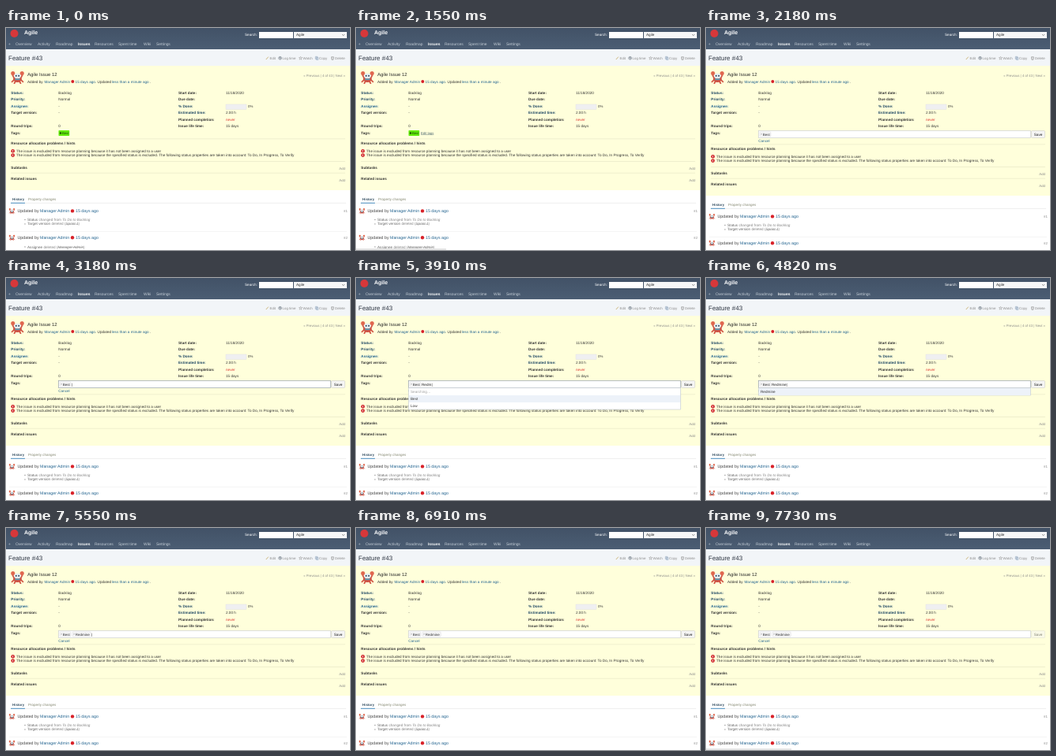
Recreate the animation shown at these times as an HTML page. Size 435 px wide and 282 px high, loop 8000 ms.

```html
<!DOCTYPE html>
<html lang="en">
<head>
<meta charset="utf-8">
<title>Editing issue tags</title>
<style>
  html, body { margin: 0; width: 100%; height: 100%; overflow: hidden; background: #fff; }
  svg { display: block; width: 100vw; height: 100vh; font-family: "Liberation Sans", Arial, sans-serif; text-rendering: geometricPrecision; }
  text { white-space: pre; }
</style>
</head>
<body>
<svg id="stage" viewBox="0 0 435 282">
  <defs>
    <linearGradient id="bar" x2="0" y2="1">
      <stop offset="0" stop-color="#425267"/><stop offset="1" stop-color="#4b5d73"/>
    </linearGradient>
    <symbol id="crab" viewBox="0 0 16 16">
      <path d="M4 9 2 5M12 9l2-4M4 11l-3 3M12 11l3 3M6 12l-2 4M10 12l2 4" stroke="#d35a48" stroke-width="1.7"/>
      <circle cx="2.6" cy="3.4" r="2.4" fill="#e0684f"/><circle cx="13.4" cy="3.4" r="2.4" fill="#e0684f"/>
      <ellipse cx="8" cy="10" rx="5" ry="4" fill="#cf4f40"/>
      <ellipse cx="8" cy="6.5" rx="4" ry="3" fill="#e4eef2"/>
      <circle cx="6.4" cy="6.4" r=".9" fill="#243a4d"/><circle cx="9.6" cy="6.4" r=".9" fill="#243a4d"/>
      <path d="M5 10.5h6" stroke="#5f9fb4" stroke-width="1.8"/>
    </symbol>
  </defs>
</svg>
<script>
const NS = 'http://www.w3.org/2000/svg';
const stage = document.getElementById('stage');
const LOOP = 8000, FORM_SHIFT = 7, PANEL_TOP = 48, PANEL_HEIGHT = 158;
const INK = '#333', LINK = '#22638f', NAVY = '#1d4663', GREY = '#8b8b8b', CREASE = '#e4e4c4';
const USER = 'Manager Admin';

function add(parent, tag, attrs, content) {
  const el = document.createElementNS(NS, tag);
  for (const key in attrs) el.setAttribute(key, attrs[key]);
  if (content !== undefined) el.textContent = content;
  return parent.appendChild(el);
}
const group = (parent = stage) => add(parent, 'g', {});
const rect = (g, x, y, width, height, fill, more) => add(g, 'rect', { x, y, width, height, fill, ...more });
const dot = (g, cx, cy, r, fill) => add(g, 'circle', { cx, cy, r, fill });
const rule = (g, y, stroke, x1 = 0, x2 = 435) => add(g, 'line', { x1, x2, y1: y, y2: y, stroke, 'stroke-width': .6 });
const avatar = (g, x, y, size) => add(g, 'use', { href: '#crab', x, y, width: size, height: size });
const text = (g, x, y, str, fill = INK, size = 4.65, more) =>
  add(g, 'text', { x, y, fill, 'font-size': size, ...more }, str);
const bold = (g, x, y, str, fill = INK, size = 4.65) => text(g, x, y, str, fill, size, { 'font-weight': 700 });

function drawHeader(g) {
  rect(g, 0, 0, 435, 27, 'url(#bar)');
  dot(g, 10.5, 7, 5, '#d8383a');
  bold(g, 23, 7.6, 'Agile', '#fff', 7);
  text(g, 302, 10.2, 'Search:', '#fff');
  rect(g, 320, 5, 43, 8, '#fff');
  rect(g, 364, 5, 67, 8, '#f5f6f7');
  text(g, 367, 10.3, 'Agile');
  add(g, 'path', { d: 'M425 8l1.6 1.6L428.2 8', fill: 'none', stroke: '#555', 'stroke-width': .6 });
  const menu = [[3, '+'], [12, 'Overview'], [40, 'Activity'], [63, 'Roadmap'], [112, 'Resources'],
    [142, 'Spent time'], [174, 'Wiki'], [190, 'Settings']];
  for (const [x, label] of menu) text(g, x, 22, label, '#c3ccd5', 4.95);
  bold(g, 91, 22, 'Issues', '#fff', 4.95);

  rect(g, 0, 27, 435, 21, '#f2f5f8');
  text(g, 3, 40.7, 'Feature #43', '#2c3440', 8);
  const actions = [
    [328.5, 'Edit', '#c3a65e', 'M.3 4l3-3.4'],
    [344.5, 'Log time', '#707a84', 'M.3 2.2a1.8 1.8 0 1 0 3.6 0a1.8 1.8 0 1 0-3.6 0M2 1v1.400h1'],
    [370.5, 'Watch', '#b0b0b0', 'M2 .3l.6 1.3h1.400l-1.100 1 .5 1.5L2 3.300.6 4.100l.5-1.5L0 1.600h1.400z'],
    [391, 'Copy', '#9fb2c6', 'M.3.3h2.400v3H.3zM1.400 1.300h2.400v3H1.400z'],
    [411, 'Delete', '#999', 'M.2.8h3.400M.6 1l.3 3.200h2L3.200 1'],
  ];
  for (const [x, label, stroke, d] of actions) {
    add(g, 'path', { d, stroke, fill: 'none', 'stroke-width': .8, transform: `translate(${x} 36)` });
    text(g, x + 5, 39.7, label, GREY, 4.4);
  }
}

function drawIssue(g) {
  avatar(g, 6, 54, 17);
  text(g, 27, 61, 'Agile Issue 12', '#2c2c2c', 6);
  text(g, 429, 61.5, '« Previous | 4 of 43 | Next »', GREY, 4.3, { 'text-anchor': 'end' });
  text(g, 27, 69.7, 'Added by ');
  text(g, 48.5, 69.7, USER, LINK);
  dot(g, 84.3, 68, 2, '#d8222a');
  text(g, 87.6, 69.7, '15 days ago', LINK);
  text(g, 113, 69.7, '. Updated ');
  text(g, 134, 69.7, 'less than a minute ago', LINK);
  text(g, 182, 69.7, '.');

  const left = [[84, 'Status:', 'Backlog', NAVY], [92.4, 'Priority:', 'Normal', NAVY],
    [100.9, 'Assignee:', '-', LINK], [109, 'Target version:', '-', INK],
    [126, 'Round trips:', '0', INK], [134.5, 'Tags:', '', INK]];
  const right = [[84, 'Start date:', '11/18/2020', INK], [92.4, 'Due date:', '', INK],
    [100.9, '% Done:', '', NAVY], [109, 'Estimated time:', '2.00 h', NAVY],
    [117.6, 'Planned completion:', 'never', INK], [126, 'Issue life time:', '15 days', INK]];
  for (const [labelX, valueX, rows] of [[6.3, 66.3, left], [218, 278, right]]) {
    for (const [y, label, value, color] of rows) {
      bold(g, labelX, y, label, color);
      text(g, valueX, y, value, value === 'never' ? '#e0302c' : INK);
    }
  }
  rect(g, 278, 97, 26, 6.4, '#efeff1', { stroke: '#e2e2e2', 'stroke-width': .5 });
  text(g, 306, 101, '0%', INK, 4.4);
}

function drawLower(g) {
  rule(g, 140.8, CREASE, 6, 429);
  bold(g, 6.3, 148, 'Resource allocation problems / hints');
  const hints = [[156.2, 'it has not been assigned to a user'],
    [161.6, 'the specified status is excluded. The following status properties are taken into account: To Do, In Progress, To Verify']];
  for (const [y, reason] of hints) {
    dot(g, 8.7, y, 2.3, '#cf1f25');
    rect(g, 8.3, y - 1.2, .8, 2.4, '#fff');
    text(g, 13, y + 1.6, 'The issue is excluded from resource planning because ' + reason);
  }
  for (const [y, label] of [[178.5, 'Subtasks'], [193.2, 'Related issues']]) {
    rule(g, y - 9, CREASE, 6, 429);
    bold(g, 6.3, y, label);
    text(g, 429, y + 1.5, 'Add', GREY, 4.3, { 'text-anchor': 'end' });
  }

  bold(g, 8, 218.8, 'History', '#365064', 4.4);
  text(g, 28, 218.8, 'Property changes', '#83866f', 4.5);
  rule(g, 222.4, '#e2e2e2', 6, 430);
  rect(g, 6, 221.8, 18, 1, '#4b8fc0');

  for (const [y, number] of [[234.2, '#1'], [268, '#2']]) {
    avatar(g, 3.5, y - 5.8, 8);
    text(g, 14.5, y, 'Updated by ', '#444', 5.3);
    text(g, 43, y, USER, LINK, 5.3);
    dot(g, 84, y - 1.8, 2.2, '#d8222a');
    text(g, 88, y, '15 days ago', LINK, 5.3);
    text(g, 432, y - .5, number, GREY, 4.4, { 'text-anchor': 'end' });
  }
  rule(g, 258.5, '#efefef', 4, 431);
  const details = [[245, 'Status', ' changed from ', 'To Do to Backlog'],
    [250.4, 'Target version', ' deleted (', 'Sprint 1', ')'],
    [279.5, 'Assignee', ' deleted (', USER, ')']];
  for (const [y, name, verb, value, close = ''] of details) {
    dot(g, 24, y - 1.5, .65, '#888');
    const line = text(g, 27, y, '', '#858585');
    add(line, 'tspan', { fill: '#666' }, name);
    add(line, 'tspan', {}, verb);
    add(line, 'tspan', { 'font-style': 'italic', 'text-decoration': close ? 'line-through' : 'none' }, value);
    add(line, 'tspan', {}, close);
  }
}

function chip(g, x, width, label) {
  rect(g, x, 132, width, 6, '#f7f7f8', { rx: .8, stroke: '#d0d0d4', 'stroke-width': .4 });
  text(g, x + 1, 136.4, '×', '#888', 4);
  text(g, x + 3.8, 136.5, label, INK, 4.5);
}

const base = group();
drawHeader(base);
const panel = rect(base, 0, PANEL_TOP, 435, PANEL_HEIGHT, '#ffffdb');
const lower = group();
drawLower(lower);
drawIssue(group());

const tag = group();
rect(tag, 66.5, 130, 13.7, 7, '#62ea0a', { rx: .8 });
dot(tag, 69, 133.5, 1.2, '#1c5200');
text(tag, 71, 135, 'Best', '#174600', 4.2);
const editLink = group();
text(editLink, 82, 134.6, 'Edit tags', '#526b72', 4.2, { 'text-decoration': 'underline' });

const form = group();
text(form, 66.2, 144.5, 'Cancel', LINK);
const field = rect(form, 66.5, 130.5, 344, 9, '#fff', { 'stroke-width': .7 });
const button = group(form);
rect(button, 411.5, 130.5, 17, 9, '#f5f5f4', { rx: 1, stroke: '#cfcfcb', 'stroke-width': .6 });
text(button, 420, 136.9, 'Save', '#222', 4.7, { 'text-anchor': 'middle' });
chip(form, 68, 14, 'Best');
const newChip = group(form);
chip(newChip, 84, 23.3, 'Redmine');
const typed = text(form, 83, 137, '', '#222');

const list = group();
const listBox = rect(list, 66.5, 139.5, 344, 27.5, '#fff', { stroke: '#bfc6cf', 'stroke-width': .6 });
const searching = text(list, 69, 145.8, 'Searching…', '#a0a0a0');
const options = group(list);
rect(options, 67, 149, 343, 9, '#edf2f9');
text(options, 69, 155, 'Best');
text(options, 69, 164.2, 'Low');
const match = group(list);
rect(match, 67, 140, 343, 9, '#edf2f9');
text(match, 69, 145.9, 'Redmine');

const loading = group();
rect(loading, 174, 92, 93, 12, '#f0f0e2', { opacity: .85 });
const spinner = add(loading, 'path', { d: 'M208 96.3a2 2 0 1 1-2 2', fill: 'none', stroke: '#8f897a', 'stroke-width': .8 });
text(loading, 213.5, 99.9, 'Loading...', '#555');

const status = group();
const statusBox = rect(status, 0, 280, 114, 2, '#e6e6e6');

// [element, start, end, start, end, ...]
const visibility = [
  [tag, 0, 2000],
  [editLink, 1180, 2000],
  [form, 2000, LOOP],
  [newChip, 5450, LOOP],
  [list, 3450, 5450],
  [searching, 3820, 4640],
  [options, 3450, 4640],
  [match, 4640, 5450],
  [loading, 1820, 2000, 4450, 4640],
  [status, 1450, 2000, 7730, LOOP],
];
// [start, x, text]
const typing = [[0, 83, ''], [3180, 83, '|'], [3820, 83, 'Re|'], [3910, 83, 'Redm|'], [4000, 83, 'Redmi|'],
  [4090, 83, 'Redmin|'], [4180, 83, 'Redmine|'], [5450, 108, '|'], [6730, 108, '']];
const listHeights = [[0, 18.5], [3820, 27.5], [4640, 9.5]];

const current = (steps, t) => steps.findLast(([start]) => t >= start);

function inside(t, spans) {
  for (let i = 0; i < spans.length; i += 2) if (t >= spans[i] && t < spans[i + 1]) return true;
  return false;
}

function render() {
  const t = performance.now() % LOOP;
  const editing = t >= 2000, focused = t >= 3180 && t < 5450;
  const shift = editing ? FORM_SHIFT : 0;
  for (const [el, ...spans] of visibility) el.style.display = inside(t, spans) ? '' : 'none';

  lower.setAttribute('transform', `translate(0 ${shift})`);
  panel.setAttribute('height', PANEL_HEIGHT + shift);

  const [, x, entry] = current(typing, t);
  typed.setAttribute('x', x);
  typed.textContent = entry;
  field.setAttribute('stroke', focused ? '#98a1ad' : '#cdd1d5');
  button.setAttribute('opacity', t >= 7360 ? .55 : 1);

  listBox.setAttribute('height', current(listHeights, t)[1]);
  options.setAttribute('transform', `translate(0 ${t < 3820 ? -9 : 0})`);
  statusBox.setAttribute('width', editing ? 108 : 114);
  spinner.setAttribute('transform', `rotate(${t * .36} 208 98.3)`);
  requestAnimationFrame(render);
}
render();
</script>
</body>
</html>
```
